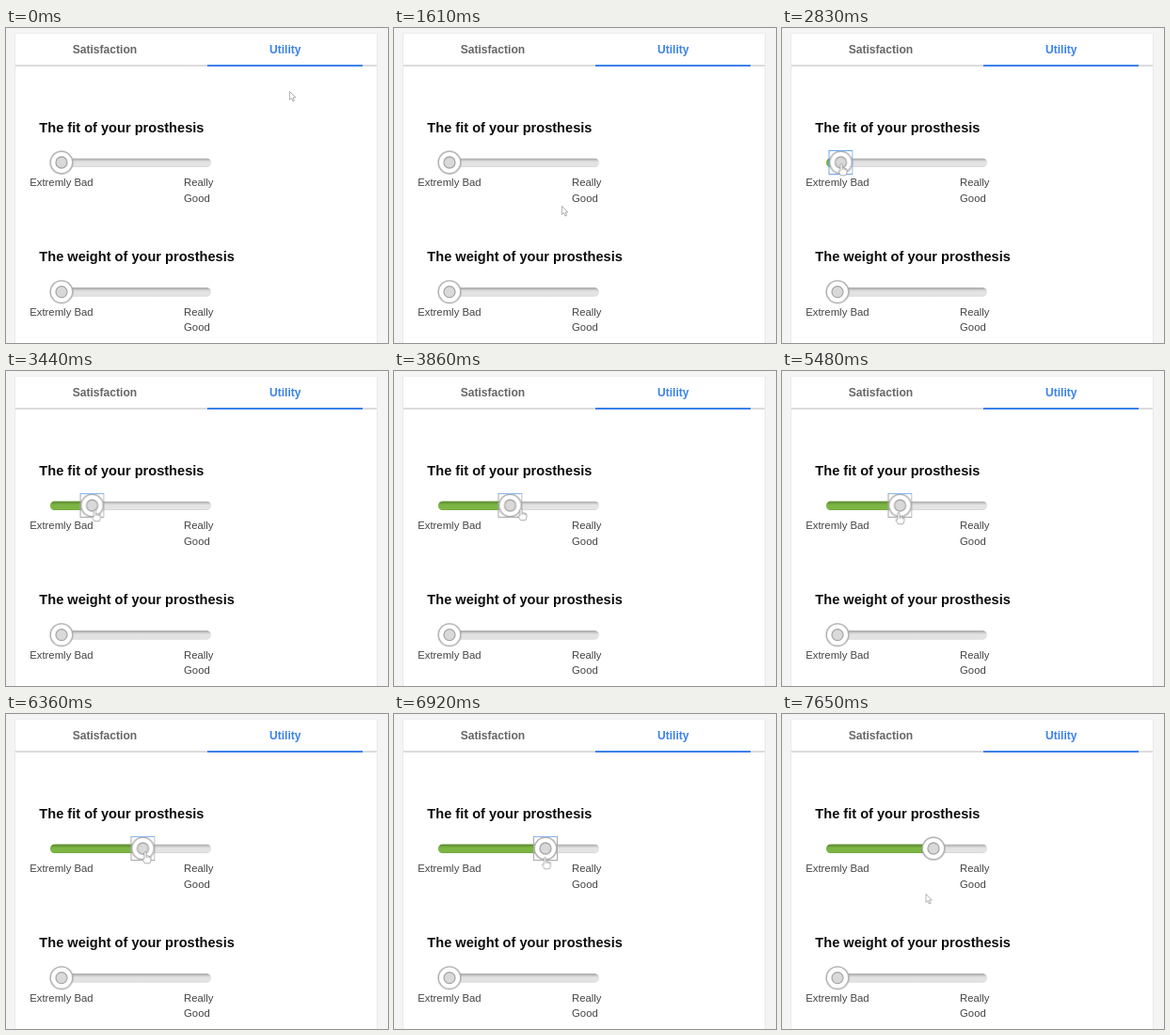
These frames come from a looping animation (406x335 px, 8210 ms). An HTML page:

```html
<!DOCTYPE html>
<html lang="en">
<head>
<meta charset="utf-8">
<title>Utility sliders</title>
<style>
  html, body { margin: 0; width: 100%; height: 100%; overflow: hidden; background: #f4f4f4; }
  svg { display: block; }
  text { font-family: "Liberation Sans", Arial, sans-serif; }
  .tab { font-size: 12.1px; font-weight: 700; }
  .title { font-size: 14.6px; font-weight: 700; fill: #0c0c0c; }
  .label { font-size: 11.35px; fill: #444; }

  .drag, .box, .blue, .cursor, .arrow, .hand {
    animation: 8.21s linear infinite;
  }
  .drag { animation-name: drag; }
  .box { animation-name: box; }
  .blue { animation-name: blue; }
  .cursor { animation-name: cursor; }
  .arrow { animation-name: arrow; animation-timing-function: step-end; }
  .hand { animation-name: hand; animation-timing-function: step-end; }
  .box, .blue { animation-timing-function: step-end; }

  @keyframes drag {
    0%, 34.46% { transform: translateX(0); }
    34.47%, 37.27% { transform: translateX(3.5px); }
    47.02%, 47.6% { transform: translateX(64.5px); }
    52.4% { transform: translateX(108px); }
    54% { transform: translateX(110px); }
    57.25%, 57.8% { transform: translateX(107px); }
    66.75% { transform: translateX(66.5px); }
    67.72%, 68.2% { transform: translateX(62px); }
    69.8%, 70.6% { transform: translateX(52px); }
    77.47%, 78.3% { transform: translateX(86.5px); }
    83.6%, 100% { transform: translateX(102px); }
  }
  @keyframes cursor {
    0%, 6.7% { transform: translate(301px, 67px); }
    11.5% { transform: translate(283px, 140px); }
    16.44% { transform: translate(253px, 207px); }
    17.1% { transform: translate(247px, 211px); }
    19.61%, 20.1% { transform: translate(178px, 189px); }
    26.43%, 27% { transform: translate(73px, 146px); }
    29.2% { transform: translate(65px, 141px); }
    31.43%, 37.27% { transform: translate(63px, 144px); }
    42% { transform: translate(95px, 147px); }
    47.02%, 47.6% { transform: translate(135px, 146px); }
    52.4% { transform: translate(172px, 150px); }
    54% { transform: translate(174px, 152px); }
    57.25%, 57.8% { transform: translate(171px, 151px); }
    66.75% { transform: translate(124px, 150px); }
    67.72%, 68.2% { transform: translate(117px, 150px); }
    69.8%, 70.6% { transform: translate(107px, 149px); }
    77.47%, 78.3% { transform: translate(148px, 146px); }
    83.6% { transform: translate(161px, 149px); }
    88.31%, 88.9% { transform: translate(157px, 168px); }
    93.18%, 100% { transform: translate(152.5px, 191px); }
  }
  @keyframes box {
    0%, 92.1%, 100% { opacity: 0; }
    34.47% { opacity: 1; }
  }
  @keyframes blue {
    0%, 100% { opacity: 1; }
    37.27% { opacity: 0; }
  }
  @keyframes arrow {
    0%, 85.8%, 100% { opacity: 1; }
    27.2% { opacity: 0; }
  }
  @keyframes hand {
    0%, 85.8%, 100% { opacity: 0; }
    27.2% { opacity: 1; }
  }
</style>
</head>
<body>
<svg width="406" height="335" viewBox="0 0 406 335">
  <defs>
    <linearGradient id="inset" x2="0" y2="1">
      <stop offset="0" stop-opacity=".28"/>
      <stop offset=".2" stop-opacity=".14"/>
      <stop offset=".4" stop-opacity="0"/>
      <stop offset=".85" stop-opacity="0"/>
      <stop offset="1" stop-opacity=".08"/>
    </linearGradient>
    <clipPath id="pill"><rect x="47" y="138.5" width="171" height="9.6" rx="4.6"/></clipPath>
    <g id="thumb">
      <circle cx="59" cy="143.2" r="13" fill="#000" opacity=".12"/>
      <circle cx="59" cy="143" r="11.7" fill="#fff" stroke="#b4b4b4" stroke-width="1.4"/>
      <circle cx="59" cy="143" r="6" fill="#d9d9d9" stroke="#a6a6a6" stroke-width="1.3"/>
    </g>
    <rect id="groove" x="47" y="138.5" width="171" height="9.6" fill="#e3e3e3"/>
    <rect id="shade" x="47" y="138.5" width="171" height="9.6" rx="4.6" fill="url(#inset)"/>
    <g id="labels" class="label">
      <text x="25.2" y="168">Extremly Bad</text>
      <text x="189" y="168">Really</text>
      <text x="189" y="184.6">Good</text>
    </g>
  </defs>

  <rect width="406" height="335" fill="#f4f4f4"/>
  <rect x="9" y="5.5" width="386" height="340" fill="#e9e9e9"/>
  <rect x="10" y="6" width="384" height="340" fill="#fff"/>
  <rect x="10" y="39" width="384" height="2" fill="#dcdcdc"/>
  <rect x="214" y="39" width="165" height="2" fill="#3b82ea"/>
  <text class="tab" x="70.7" y="27" fill="#666">Satisfaction</text>
  <text class="tab" x="280" y="27" fill="#3b82ea">Utility</text>

  <text class="title" x="35.3" y="111">The fit of your prosthesis</text>
  <g clip-path="url(#pill)">
    <use href="#groove"/>
    <rect class="drag" x="-112" y="138" width="171" height="11" fill="#7cb544" id="fill"/>
    <rect class="box-off" x="47" y="138" width="0" height="11"/>
    <use href="#shade"/>
  </g>
  <use href="#labels"/>
  <g class="drag">
    <use href="#thumb"/>
    <g class="box" fill="none">
      <rect x="46.5" y="130.5" width="25" height="25" stroke="#a9a9a9"/>
      <path d="M46.5 130.5h25" stroke="#86b4ee"/>
      <rect class="blue" x="46.5" y="130.5" width="25" height="25" stroke="#6ea4ec"/>
    </g>
  </g>

  <text class="title" x="35.3" y="248.3">The weight of your prosthesis</text>
  <g transform="translate(0 137.6)">
    <g clip-path="url(#pill)">
      <use href="#groove"/>
      <use href="#shade"/>
    </g>
    <use href="#labels"/>
    <use href="#thumb"/>
  </g>

  <g class="cursor" fill="#fff" stroke="#999" stroke-width=".8" stroke-linejoin="round">
    <path class="arrow" d="M.4 .4V9.4L2.4 7.5 4 11 5.5 10.3 4 7H6.8Z"/>
    <g class="hand">
      <path d="M-1.1 1.2Q0-.4 1.1 1.2V5Q2.2 4 3 5.2Q4.2 4.4 4.7 5.7Q6 5.2 6 6.9V9.6L4.8 12.8H-.5L-3 8.7Q-2.8 7-1.1 8.3Z"/>
      <path d="M1.1 5v2M3 5.4v1.8M4.7 5.8v1.6" fill="none"/>
    </g>
  </g>
</svg>
</body>
</html>
```
